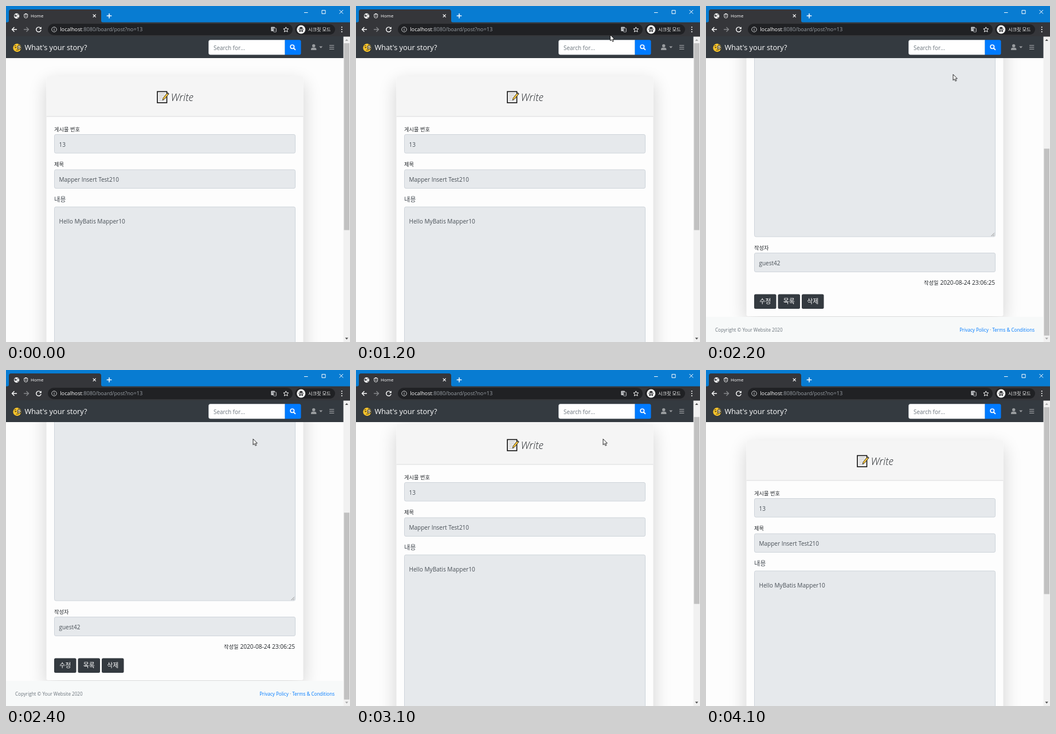
Animation of 600 by 587 pixels, one loop 4300 ms. Source, as an HTML page:

```html
<!DOCTYPE html>
<html lang="ko">
<head>
<meta charset="utf-8">
<title>Home</title>
<style>
@property --scroll { syntax: "<number>"; inherits: true; initial-value: 0; }
html, body { margin: 0; width: 100%; height: 100%; overflow: hidden; background: #fdfdfd; }
svg.stage {
  display: block; width: 600px; height: 587px;
  animation: scroll 4300ms step-end infinite;
}
text { font: 10px "Open Sans", "Noto Sans", sans-serif; fill: #495057; white-space: pre; }
.ko { font-family: "Noto Sans CJK KR", "Noto Sans CJK", sans-serif; }
.label { font-size: 9.2px; fill: #212529; }
.small { font-size: 8.1px; fill: #6c757d; }
.link { fill: #007bff; }
.white { fill: #fff; }
.title { font-size: 18px; font-weight: 300; font-style: italic; fill: #212529; }
.field { fill: #e6e9ec; stroke: #ced4da; }
.line { fill: none; stroke: #fff; }
.btn { fill: #343a40; }
.page { transform: translateY(calc(var(--scroll) * -1px)); }
.thumb { transform: translateY(calc(var(--scroll) * .612px)); }
.up { opacity: clamp(.45, var(--scroll), 1); }
.down { opacity: clamp(.45, 301 - var(--scroll), 1); }
.cursor { transform: translate(443px, -40px); animation: cursor 4300ms step-end infinite; }

@keyframes scroll {
  0% { --scroll: 0; }
  30.23% { --scroll: 18; }
  32.55% { --scroll: 78; }
  34.88% { --scroll: 140; }
  37.2% { --scroll: 186; }
  39.53% { --scroll: 206; }
  41.86% { --scroll: 222; }
  44.18% { --scroll: 262; }
  46.51% { --scroll: 290; }
  48.83% { --scroll: 301; }
  62.79% { --scroll: 175; }
  65.11% { --scroll: 73; }
  67.44% { --scroll: 40; }
  69.76% { --scroll: 28; }
  81.39% { --scroll: 16; }
  83.72% { --scroll: 5; }
  86.04%, 100% { --scroll: 0; }
}
@keyframes cursor {
  0% { transform: translate(443px, -40px); }
  27.9% { transform: translate(443px, 50px); }
  30.23% { transform: translate(440px, 72px); }
  32.55% { transform: translate(436px, 92px); }
  34.88% { transform: translate(433px, 103px); }
  37.2% { transform: translate(432px, 108px); }
  39.53% { transform: translate(432px, 109px); }
  44.18% { transform: translate(431px, 114px); }
  48.83% { transform: translate(430.5px, 118px); }
  51.16% { transform: translate(430.5px, 119px); }
  55.81% { transform: translate(430.5px, 120px); }
  74.41% { transform: translate(430.5px, 122px); }
  76.74% { transform: translate(430.5px, 124.5px); }
  90.69% { transform: translate(432px, 100px); }
  93.02% { transform: translate(437px, 45px); }
  95.34%, 100% { transform: translate(443px, -40px); }
}
</style>
</head>
<body>
<svg class="stage" viewBox="0 0 600 587">
  <defs>
    <filter id="blur" x="-30%" y="-30%" width="160%" height="160%">
      <feGaussianBlur stdDeviation="16"/>
    </filter>
  </defs>
  <rect width="600" height="587" fill="#fdfdfd"/>

  <g class="page">
    <rect x="70.5" y="134" width="448" height="720" rx="3" fill="#000" opacity=".175" filter="url(#blur)"/>
    <rect x="70.5" y="123" width="448" height="720" rx="3" fill="#fdfdfd"/>
    <path d="M70.5 193V126a3 3 0 0 1 3-3h442a3 3 0 0 1 3 3v67z" fill="#f5f5f5"/>
    <path d="M70.5 193h448" stroke="#dadbdc"/>

    <!-- memo icon -->
    <rect x="264" y="149.5" width="16.5" height="19.5" fill="#f4f4f4" stroke="#111" stroke-width="1.6"/>
    <path d="M267 153h10M267 156h9M267 159h6M267 162h5M267 165h9" stroke="#b5b5b5" stroke-width=".9"/>
    <path d="M273 164.5l1.2-4 7.6-9.2 2.4 2-7.6 9.2z" fill="#fbc83a" stroke="#222" stroke-width=".9"/>
    <path d="M280.5 152.8l1.3-1.6 2.4 2-1.3 1.6z" fill="#555"/>
    <text class="title" x="287.5" y="165.5">Write</text>

    <text class="ko label" x="84" y="218.5">게시물 번호</text>
    <rect class="field" x="84.5" y="224.5" width="420" height="32.5" rx="2.5"/>
    <text x="92.5" y="245.5">13</text>

    <text class="ko label" x="84" y="279.5">제목</text>
    <rect class="field" x="84.5" y="286" width="420" height="32.5" rx="2.5"/>
    <text x="92.5" y="306.7">Mapper Insert Test210</text>

    <text class="ko" x="84" y="341.5" style="font-size:11.2px">내용</text>
    <rect class="field" x="84.5" y="351" width="420" height="353" rx="2.5"/>
    <text x="92.5" y="379.7" style="font-size:10.1px">Hello MyBatis Mapper10</text>
    <path d="M497.5 703l5.5-5.5M500.5 703l2.5-2.5" stroke="#777" stroke-width=".8"/>

    <text class="ko label" x="84" y="726.5">작성자</text>
    <rect class="field" x="84.5" y="732.5" width="420" height="33" rx="2.5"/>
    <text x="92.5" y="753.7">guest42</text>

    <text class="ko label" x="380" y="788">작성일</text>
    <text x="408.5" y="788" style="font-size:10.15px;fill:#212529">2020-08-24 23:06:25</text>

    <g class="btn">
      <rect x="84" y="804.5" width="38.5" height="25.5" rx="2.5"/>
      <rect x="125.5" y="804.5" width="38.5" height="25.5" rx="2.5"/>
      <rect x="167" y="804.5" width="38.5" height="25.5" rx="2.5"/>
    </g>
    <g text-anchor="middle" style="--size:10.9px">
      <text class="ko white" x="103.2" y="821.3" style="font-size:var(--size)">수정</text>
      <text class="ko white" x="144.7" y="821.3" style="font-size:var(--size)">목록</text>
      <text class="ko white" x="186.2" y="821.3" style="font-size:var(--size)">삭제</text>
    </g>

    <rect y="844" width="588" height="46" fill="#f7f9f9"/>
    <text class="small" x="16" y="869.5">Copyright © Your Website 2020</text>
    <text class="small" x="573" y="869.5" text-anchor="end"><tspan class="link">Privacy Policy</tspan> · <tspan class="link">Terms &amp; Conditions</tspan></text>
  </g>

  <!-- scrollbar -->
  <rect x="588.5" y="53" width="11.5" height="534" fill="#f1f1f1"/>
  <rect class="thumb" x="589.5" y="65" width="9.5" height="326.5" fill="#c1c1c1"/>
  <path class="up" d="M591.5 61l2.7-3.2 2.7 3.2z" fill="#505050"/>
  <path class="down" d="M591.5 579.5l2.7 3.2 2.7-3.2z" fill="#505050"/>

  <!-- window frame -->
  <rect width="600" height="29" fill="#087cd2"/>
  <path d="M0 28.5h2a3 3 0 0 0 3-3V10a4 4 0 0 1 4-4h153a4 4 0 0 1 4 4v15.500a3 3 0 0 0 3 3h431V53.500H0z" fill="#35363a"/>
  <g class="line">
    <path d="M520 11.500h6.500M551 7.500h6v6h-6zM581.500 7l6.500 6.500M588 7l-6.500 6.500"/>
    <path d="M180 13v8.500M175.700 17.200h8.600" stroke-width="1.5"/>
    <path d="M151.700 14.700l5 5M156.700 14.700l-5 5" stroke-width="1.2"/>
  </g>
  <circle cx="18.500" cy="17.500" r="4.700" fill="#f1f1f1"/>
  <path d="M15 15l3 .5 1.500 2-2.500 1.500-2.500-1zM19.500 13.500l2.500 2-1.500 1zM20 19l2 .5-2 2z" fill="#55585c"/>
  <path class="line" d="M31.700 14.500h6v3.500a3 3 0 0 1-6 0zM33 13.500h3.400M33.500 17.500h2.500" stroke-width=".9"/>
  <text class="white" x="43" y="20.300" style="font-size:7.900px">Home</text>

  <!-- toolbar -->
  <rect x="73" y="31" width="427" height="20" rx="10" fill="#202124"/>
  <rect x="504" y="32" width="70" height="18" rx="9" fill="#202124"/>
  <g class="line" stroke-width="1.400">
    <path d="M19 41h-8M14.500 37l-4 4 4 4"/>
    <path d="M31 41h8M35.500 37l4 4-4 4" stroke="#85878a"/>
    <path d="M60.300 38.500a4.200 4.200 0 1 0 .8 3.300"/>
  </g>
  <path d="M61.800 36.200v4h-4z" fill="#fff"/>
  <circle class="line" cx="84" cy="41" r="4.300" style="stroke:#c8cacc"/>
  <path d="M84 40.300v3M84 38.300v1" stroke="#c8cacc" stroke-width="1.100"/>
  <text x="94.300" y="44.300" style="font-size:9.200px;fill:#9aa0a6"><tspan class="white">localhost</tspan>:8080/board/post?no=13</text>
  <rect x="462.300" y="36.500" width="6.500" height="7.500" rx=".8" fill="#c4c6c9"/>
  <rect x="466.500" y="38.800" width="5" height="6.500" rx=".8" fill="#202124" stroke="#c4c6c9" stroke-width=".9"/>
  <path d="M464 39h3M465.500 38v1q0 2-1.500 3M468 43.500l1-2.500 1 2.500" fill="none" stroke="#777a7e" stroke-width=".8"/>
  <path class="line" d="M488.300 36.800l1.300 2.900 3.100.3-2.300 2.100.7 3.100-2.800-1.600-2.800 1.600.7-3.100-2.300-2.100 3.100-.3z"/>
  <circle cx="514.700" cy="41" r="7.500" fill="#f5f5f5"/>
  <path d="M510 40.300h9.400v.9h-9.400zM511.800 39.800l.8-3h4.200l.8 3z" fill="#303134"/>
  <path d="M514 43.300h1.400" stroke="#303134"/>
  <circle cx="512.700" cy="43.500" r="1.500" fill="#303134"/>
  <circle cx="516.700" cy="43.500" r="1.500" fill="#303134"/>
  <text class="ko white" x="527" y="43.900" style="font-size:8.100px">시크릿 모드</text>
  <path d="M585.700 37v.01M585.700 41v.01M585.700 45v.01" stroke="#fff" stroke-width="2" stroke-linecap="round"/>

  <!-- navbar -->
  <rect y="53" width="588.500" height="38" fill="#343a40"/>
  <circle cx="19.500" cy="73" r="7.200" fill="#f8c52c"/>
  <path d="M14.500 70q1.500-1.500 3-.5M21 67.500q2-1.500 3.500.3M17.500 77.300q2.500-1 4.500 0" fill="none" stroke="#443311"/>
  <circle cx="16.500" cy="72.500" r="1.100" fill="#332200"/>
  <circle cx="22.800" cy="72.300" r="3" fill="#fff1bd" stroke="#30343a" stroke-width="1.100"/>
  <circle cx="22.600" cy="72.300" r="1.100" fill="#332200"/>
  <path d="M25.700 73.500q1 3-.7 6" fill="none" stroke="#222" stroke-width=".8"/>
  <text class="white" x="32.500" y="77.300" style="font-size:12.700px">What's your story?</text>

  <path d="M486.500 59.500H356.500a3 3 0 0 0-3 3V82a3 3 0 0 0 3 3h130z" fill="#fff" stroke="#ced4da" stroke-width=".7"/>
  <text x="362" y="76.500" style="font-size:9.900px;fill:#6c757d">Search for...</text>
  <path d="M486.500 59.200h25a3 3 0 0 1 3 3V82.200a3 3 0 0 1-3 3h-25z" fill="#007bff"/>
  <circle class="line" cx="499.300" cy="71.200" r="3.200" stroke-width="1.700"/>
  <path class="line" d="M501.700 73.600l3.200 3.200" stroke-width="2"/>
  <g fill="#999c9f">
    <circle cx="536.700" cy="69.500" r="2.700"/>
    <path d="M532 77v-1.300a3 3 0 0 1 3-3h3.400a3 3 0 0 1 3 3V77z"/>
    <path d="M546.200 70.500h6l-3 3.200z"/>
    <path d="M564 68.300h8.300v1.200h-8.300zM564 71.500h8.300v1.200h-8.300zM564 74.700h8.300v1.200h-8.300z"/>
  </g>

  <path class="cursor" d="M.5.5v10.300l2.400-2.200 1.700 3.700 1.700-.8-1.600-3.600h3.100z" fill="#fff" stroke="#111" stroke-width=".9"/>
</svg>
</body>
</html>
```
